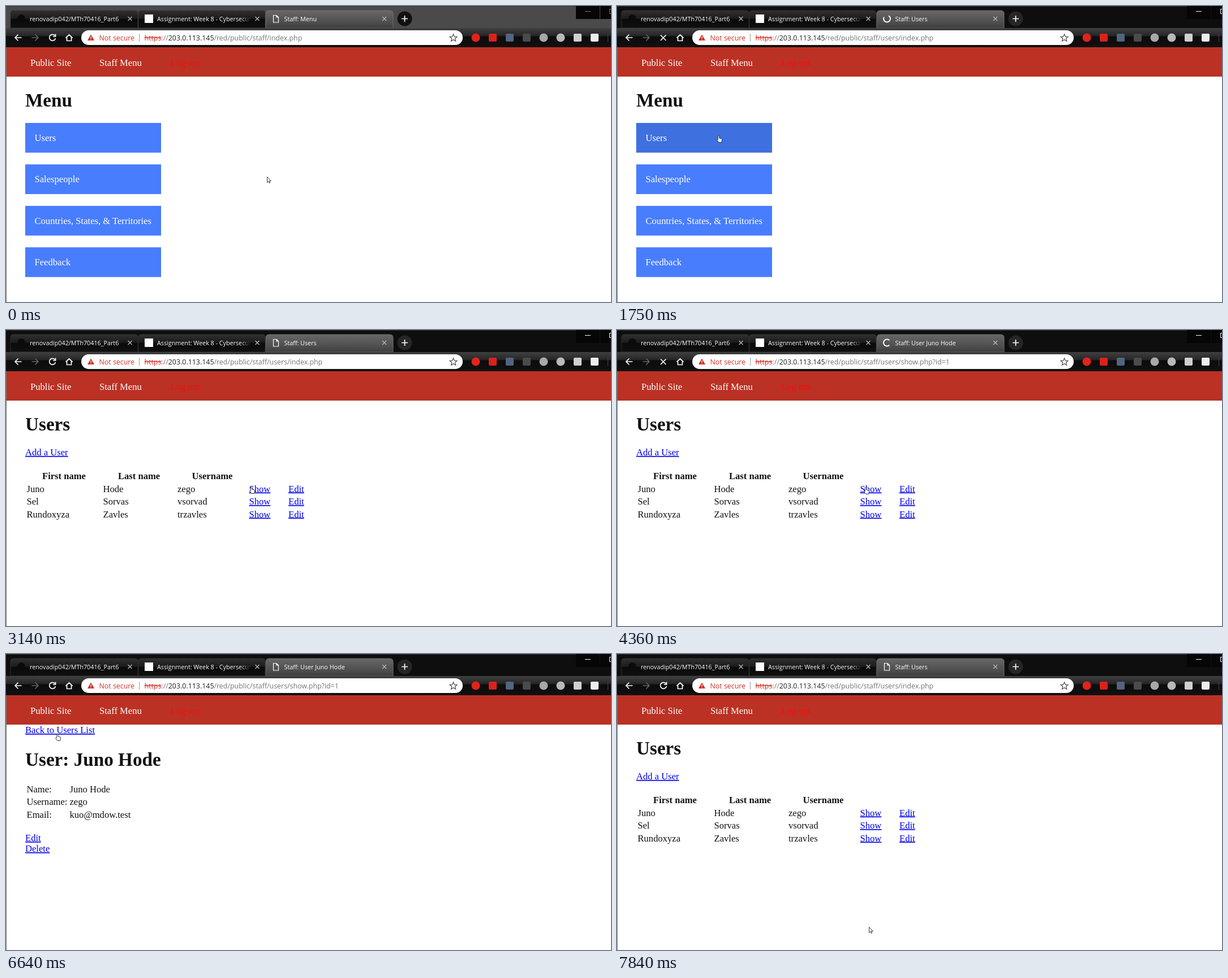
These frames come from a looping animation (1069x524 px, 8000 ms). An HTML page:

```html
<!DOCTYPE html>
<html lang="en">
<head>
<meta charset="utf-8">
<title>Staff pages</title>
<style>
  html, body { margin: 0; width: 100%; height: 100%; overflow: hidden; background: #fff; }
  svg { display: block; }
  text { white-space: pre; }
  .ui { font-family: "Open Sans", sans-serif; font-size: 10.75px; fill: #fff; }
  .url { font-size: 12.4px; fill: #70757a; }
  .page { font-family: "Liberation Serif", serif; font-size: 16.6px; fill: #111; }
  .h1 { font-size: 33.2px; font-weight: bold; }
  .b { font-weight: bold; }
  .w { fill: #fff; }
  .a { fill: #00e; text-decoration: underline; }
  .line { fill: none; stroke: #fff; stroke-width: 1.7; }
</style>
</head>
<body>
<svg width="1069" height="524" viewBox="0 0 1069 524">
  <defs>
    <linearGradient id="tab" x2="0" y2="1">
      <stop stop-color="#303030"/><stop offset=".45" stop-color="#1c1c1c"/>
      <stop offset=".5" stop-color="#0a0a0a"/><stop offset="1" stop-color="#101010"/>
    </linearGradient>
    <linearGradient id="front" x2="0" y2="1">
      <stop stop-color="#686868"/><stop offset=".3" stop-color="#5c5c5c"/>
      <stop offset=".75" stop-color="#4b4b4b"/><stop offset="1" stop-color="#3c3c3c"/>
    </linearGradient>
    <linearGradient id="bar" x2="0" y2="1">
      <stop stop-color="#404040"/><stop offset=".4" stop-color="#262626"/>
      <stop offset=".45" stop-color="#0c0c0c"/><stop offset="1" stop-color="#101010"/>
    </linearGradient>
    <linearGradient id="fade" gradientUnits="userSpaceOnUse" x1="415" x2="432">
      <stop stop-color="#fff"/><stop offset="1" stop-color="#fff" stop-opacity="0"/>
    </linearGradient>
  </defs>

  <rect id="frame" width="1069" height="39"/>
  <path d="M0 .5H1069" stroke="#333"/>
  <path d="M1007 0h42v23h-42zM1050 0h19v23h-19z" fill="#060606"/>
  <path id="controls" d="M1023 9.5h10M1069 5.5h-2.5v8h2.5" fill="none"/>

  <path d="M8 39V13q0-5 5-5H228q5 0 5 5V39zM234 39V13q0-5 5-5H453q5 0 5 5V39z" fill="url(#tab)" stroke="#383838" stroke-width=".8"/>
  <path d="M459 39V14q0-6 6-6H678q6 0 6 6V39z" fill="url(#front)" stroke="#777" stroke-width=".8"/>
  <circle cx="704.5" cy="22.5" r="13" id="plus"/>
  <path class="line" d="M699 22.5h11M704.5 17v11"/>
  <circle cx="27" cy="22" r="7" fill="#0b0b0b"/>
  <rect x="245" y="15" width="15" height="15" fill="#fff"/>
  <path d="M215.500 19l7 7m0-7l-7 7M440.500 19l7 7m0-7l-7 7M665 19l7 7m0-7l-7 7" stroke="#bbb" stroke-width="1.2"/>
  <g class="ui">
    <text x="42" y="26.500">renovadip042/MTh70416_Part6</text>
    <text x="267" y="26.500" fill="url(#fade)" style="fill:url(#fade)">Assignment: Week 8 - Cybersecur</text>
    <text x="491.500" y="26.500" id="title"></text>
  </g>
  <path id="file" class="line" style="stroke-width:1.2" d="M472.500 16.500h5.500l3.500 3.500v9h-9zM478 16.500v3.500h3.500"/>
  <path id="spin" class="line" style="stroke-width:2" d="M6 0A6 6 0 1 1 0 -6"/>

  <rect y="39" width="1069" height="34" fill="url(#bar)"/>
  <g class="line">
    <path d="M27.500 56H16.500M21.500 50.500L16 56l5.500 5.500"/>
    <path d="M45.500 56H56.500M51.500 50.500L57 56l-5.500 5.500" stroke="#666"/>
    <path id="reload" d="M86.500 52.500A5.500 5.500 0 1 0 87.500 57M87.500 49.500v4.500h-4.500"/>
    <path id="stop" d="M77 51.500l9.500 9.500m0-9.500l-9.500 9.500"/>
    <path d="M105.500 56.500l6-5.500 6 5.500M107.500 55.500v6h8v-6"/>
  </g>
  <rect x="133" y="43" width="674" height="26" rx="13" fill="#fff"/>
  <path d="M150 50.500l6 10.500h-12z" fill="#d02f25"/>
  <path d="M150 54v3.500m0 1v1.300" stroke="#fff" stroke-width="1.2"/>
  <path d="M235.500 49v14" stroke="#999"/>
  <path d="M790.500 50l1.800 4.200 4.600.4-3.500 3 1.100 4.500-4-2.400-4 2.400 1.100-4.500-3.500-3 4.600-.4z" fill="none" stroke="#555" stroke-width="1.300"/>
  <g class="ui">
    <text class="url" x="164.500" y="60.500" style="fill:#d02f25">Not secure</text>
    <text class="url" x="244.500" y="60.500"><tspan fill="#d02f25" text-decoration="line-through">https</tspan>://<tspan fill="#202124">203.0.113.145</tspan><tspan id="path"></tspan></text>
  </g>
  <g id="icons"></g>
  <path d="M1063.500 48v16" stroke="#444"/>

  <rect y="73" width="1069" height="52" fill="#bb3123"/>
  <g class="page">
    <text class="w" x="43" y="106">Public Site</text>
    <text class="w" x="165" y="106">Staff Menu</text>
    <text x="290" y="106" fill="#f01010">Log out</text>
    <g id="content"></g>
  </g>
  <path d="M.5 73V524" stroke="#777"/>
  <path id="cursor" fill="#fff" stroke="#222" stroke-width=".9" stroke-linejoin="round"/>
</svg>

<script>
const $ = id => document.getElementById(id);
const text = (x, y, str, cls = '') => `<text x="${x}" y="${y}" class="${cls}">${str}</text>`;

const icons = ['#e3231b', '#dc201b', '#52647f', '#4b4b4b', '#a8a8a8', '#b9b9b9', '#d0d0d0', '#eee'];
$('icons').innerHTML = icons.map((color, i) => {
  const x = 830 + i * 30;
  return [0, 4, 5].includes(i)
    ? `<circle cx="${x}" cy="56" r="7.5" fill="${color}"/>`
    : `<rect x="${x - 7}" y="49" width="14" height="14" rx="2" fill="${color}"/>`;
}).join('');

const people = [
  ['Juno', 'Hode', 'zego'],
  ['Sel', 'Sorvas', 'vsorvad'],
  ['Rundoxyza', 'Zavles', 'trzavles']
];

const pages = {
  menu: text(34, 178, 'Menu', 'h1') +
    ['Users', 'Salespeople', 'Countries, States, &amp; Territories', 'Feedback'].map((label, i) => {
      const y = 207 + i * 73.4;
      return `<rect ${i ? '' : 'id="first"'} x="34" y="${y}" width="240" height="52.6" fill="#487dfe"/>` +
        text(50.5, y + 32, label, 'w');
    }).join(''),
  users: text(34, 178, 'Users', 'h1') + text(34, 222, 'Add a User', 'a') +
    text(64, 263.500, 'First name', 'b') + text(198, 263.500, 'Last name', 'b') + text(328.500, 263.500, 'Username', 'b') +
    people.map((person, i) => [...person, 'Show', 'Edit'].map((cell, j) =>
      text([36.5, 171.5, 303, 429.5, 499][j], 286.5 + i * 22.5, cell, j > 2 ? 'a' : '')).join('')).join(''),
  show: text(34, 140, 'Back to Users List', 'a') + text(34, 198, 'User: Juno Hode', 'h1') +
    [['Name:', 'Juno Hode'], ['Username:', 'zego'], ['Email:', 'kuo@mdow.test']].map(([key, value], i) =>
      text(36.5, 244.5 + i * 22.5, key) + text(112.5, 244.5 + i * 22.5, value)).join('') +
    text(34, 331, 'Edit', 'a') + text(34, 350, 'Delete', 'a')
};

const arrow = 'M.5 .5V10.500L2.800 8.400L4.300 11.500L5.700 10.900L4.300 7.700H7.300Z';
const hand = 'M3.500 .5Q4.800.5 4.800 2V5L8.500 5.800Q9.800 6.200 9.500 8L8.600 12.500H4L.8 8.500Q.3 7 2.300 7.500V2Q2.300.5 3.500.5Z';

const at = (x, y, pointer) => ({ x, y, ...(pointer && { pointer }) });
const usersTab = { title: 'Staff: Users', path: 'users/index.php' };

// Each step changes part of the state; spin is the angle of the loading arc, or null.
const steps = [
  [0, { page: 'menu', title: 'Staff: Menu', path: 'index.php', frame: '#4a4a4a', spin: null, hover: false, ...at(461, 302, arrow) }],
  [260, at(345, 240)],
  [380, at(257, 185)],
  [680, at(220, 200)],
  [810, at(190, 213)],
  [960, { hover: true, ...at(176, 229, hand) }],
  [1240, { frame: '#2c2c2c' }],
  [1360, { frame: '#0e0e0e', spin: 100 }],
  [1510, { spin: 10 }],
  [1630, { spin: -80, ...usersTab }],
  [1750, { spin: -60 }],
  [1900, { spin: null, page: 'users' }],
  [2180, at(130, 212)],
  [2300, at(78, 192, arrow)],
  [2420, at(185, 214)],
  [2540, at(288, 236)],
  [2840, at(409, 262)],
  [2990, at(422, 273)],
  [3140, at(430, 277, hand)],
  [3270, at(436, 278)],
  [3820, { spin: 100 }],
  [3970, { spin: 10 }],
  [4100, { spin: -80, title: 'Staff: User Juno Hode', path: 'users/show.php?id=1' }],
  [4220, { spin: 150 }],
  [4360, { spin: 45 }],
  [4480, { spin: null, page: 'show' }],
  [4760, at(409, 170, arrow)],
  [4890, at(490, 50)],
  [5030, at(307, 176)],
  [5150, at(590, 50)],
  [5300, at(560, 32)],
  [5420, at(475, 82)],
  [5540, at(510, 121)],
  [5810, at(86, 151)],
  [6220, at(86, 144)],
  [6370, at(85, 143)],
  [6490, at(84, 141, hand)],
  [6640, at(87, 141)],
  [7170, { spin: 100, path: usersTab.path }],
  [7310, { spin: 10, ...usersTab }],
  [7460, { spin: null, page: 'users' }],
  [7840, at(445, 483, arrow)]
];

const show = (id, on) => $(id).setAttribute('visibility', on ? 'visible' : 'hidden');
let shown = -1;

function draw(time) {
  const count = steps.filter(([start]) => start <= time).length;
  if (count === shown) return;
  shown = count;
  const state = Object.assign({}, ...steps.slice(0, count).map(step => step[1]));
  const idle = state.frame === '#4a4a4a', loading = state.spin !== null;
  $('content').innerHTML = pages[state.page];
  if (state.hover && state.page === 'menu') $('first').setAttribute('fill', '#3e70e0');
  $('title').textContent = state.title;
  $('path').textContent = '/red/public/staff/' + state.path;
  $('frame').setAttribute('fill', state.frame);
  $('plus').setAttribute('fill', idle ? '#101010' : '#262626');
  $('controls').setAttribute('stroke', idle ? '#777' : '#fff');
  show('file', !loading);
  show('reload', !loading);
  show('stop', loading);
  show('spin', loading);
  $('spin').setAttribute('transform', `translate(477 22.5) rotate(${state.spin || 0})`);
  $('cursor').setAttribute('d', state.pointer);
  $('cursor').setAttribute('transform', `translate(${state.x} ${state.y})`);
}

const begin = performance.now();
function tick() {
  draw((performance.now() - begin) % 8000);
  requestAnimationFrame(tick);
}
tick();
</script>
</body>
</html>
```
